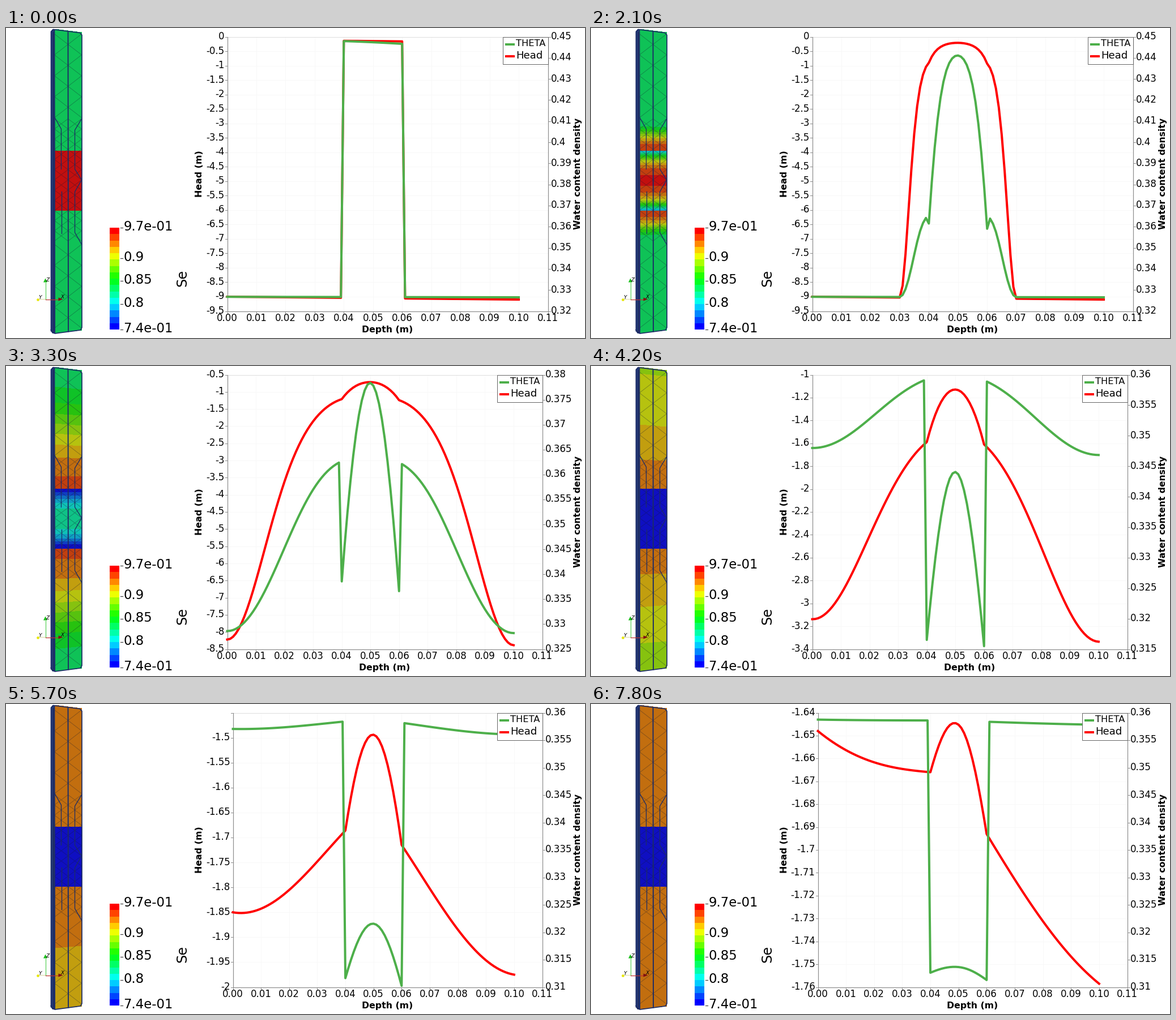
Animation, 1022 px wide and 548 px high, one loop 8000 ms. Source, as a matplotlib script:

```python
import colorsys

import numpy as np
import matplotlib.pyplot as plt
from matplotlib.animation import FuncAnimation
from matplotlib.colors import ListedColormap
from matplotlib.patches import Polygon, Rectangle

W, H, DPI = 1022, 548, 100
TOP, BOTTOM = 15, 500
GREEN, RED, NAVY = "#4daf4a", "#ff0000", "#1c2c66"
PX = 72 / DPI

plt.rcParams["font.family"] = "DejaVu Sans"
fig = plt.figure(figsize=(W / DPI, H / DPI), dpi=DPI, facecolor="white")
ax = fig.add_axes([0, 0, 1, 1])
ax.axis("off")


# ---------- soil model ----------
D = np.arange(101) / 1000            # depth of each node
LAYER = np.abs(D - 0.05) - 0.01      # distance outside the middle layer
INSIDE = LAYER < 0.0005

# step: head without gravity at the top, upper joint, centre, lower joint, bottom
KEYS = {
    0: (-9, -0.1, -0.1, -0.1, -9),
    1: (-9, -0.86, -0.1, -0.87, -9),
    7: (-9, -0.86, -0.16, -0.87, -9),
    10: (-9, -1.12, -0.54, -1.13, -9),
    11: (-8.22, -1.17, -0.664, -1.18, -8.285),
    14: (-3.138, -1.549, -1.079, -1.549, -3.235),
    19: (-1.85, -1.646, -1.444, -1.655, -1.875),
    23: (-1.6875, -1.6323, -1.5595, -1.6405, -1.7018),
    26: (-1.648, -1.626, -1.5952, -1.633, -1.6585),
}


def key_heads(t):
    """Key heads at step t, each stretch slowing down exponentially."""
    times = list(KEYS)
    k = min(np.searchsorted(times, t, "right") - 1, len(times) - 2)
    a, b = times[k], times[k + 1]
    u = (1 - np.exp(-0.3 * (t - a))) / (1 - np.exp(-0.3 * (b - a)))
    return (1 - u) * np.array(KEYS[a]) + u * np.array(KEYS[b])


def blend(far, near, u, bend):
    """Suction from far to near in log scale along a sine-squared rise."""
    u = np.clip(u, 0, 1)
    rise = (np.sin(np.pi / 2 * u * bend) / np.sin(np.pi / 2 * bend)) ** 2
    return far * (near / far) ** rise


def head(t):
    top, joint0, centre, joint1, bottom = key_heads(t)
    upper = D <= 0.05
    end, joint = np.where(upper, top, bottom), np.where(upper, joint0, joint1)
    reach = 0.01 * 2 ** ((t - 7) / 2)          # how far the wetting front has come
    bend = 0.45 + 0.44 * (1 - (joint / end) ** 2.4)
    outer = blend(end, joint, 1 - LAYER / min(reach, 0.04), bend)
    inner = blend(centre, joint, 1 + LAYER / min(reach, 0.01), 0.4)
    return np.where(INSIDE, inner, outer) - D


def water(h):
    p = np.log(-h)
    return np.where(INSIDE,
                    np.polyval([0.003415, -0.007968, -0.076904, 0.3535], p),
                    np.polyval([0.0011, -0.00624, -0.0088, 0.36457], p))


def saturation(theta, d):
    se = np.where(INSIDE, theta / 0.46, 0.927 + 3.3 * (theta - 0.3568))
    parts = [np.interp(d, D[a:b], se[a:b]) for a, b in ((0, 40), (40, 61), (61, 101))]
    return np.where(d < 0.04, parts[0], np.where(d < 0.06, parts[1], parts[2]))


# ---------- drawing helpers ----------
def line(x, y, color, px=1.0, z=2, **kw):
    return ax.plot(x, y, color=color, lw=px * PX, zorder=z, **kw)[0]


def text(x, y, s, px, ha="center", z=6, **kw):
    return ax.text(x, y, s, fontsize=px * PX, ha=ha, va="center", zorder=z, **kw)


# ---------- sample column ----------
RAINBOW = [colorsys.hsv_to_rgb((15 - i) / 15 * 2 / 3, 1, 1) for i in range(16)]
SHADED = ListedColormap([[c * 0.7 + 0.06 for c in rgb] for rgb in RAINBOW])

ROWS = 540
edge = np.linspace(0, 1, ROWS + 1)
cell = (edge[:-1] + edge[1:]) / 20
fx = np.tile([85.0, 133.5], (ROWS + 1, 1))
fy = np.column_stack([1.5 + 537 * edge, 7 + 526 * edge])
face = ax.pcolormesh(fx, fy, np.zeros((ROWS, 1)), cmap=SHADED, vmin=0, vmax=16, zorder=2)

# integer coordinates are pixel centres
ax.set_xlim(-0.5, W - 0.5)
ax.set_ylim(H - 0.5, -0.5)

ax.add_patch(Polygon([(85, 3), (82, 2), (79, 6), (79, 535), (82, 539), (86, 539)],
                     fc="#243a78", ec=NAVY, lw=PX, zorder=2))
line([82, 82], [6, 536], "#1a2250", 1, 3)


def net(xs, y0, y1, dy):
    """Zigzag triangle edges between neighbouring columns."""
    px, py = [], []
    for n, (a, b) in enumerate(zip(xs[:-1], xs[1:])):
        if n % 2:
            a, b = b, a
        for y in np.arange(y0, y1 - dy / 2, dy):
            px += [a, b, a, np.nan]
            py += [y, y + dy / 2, y + dy, np.nan]
    line(px, py, "#101830", 0.9, 3, alpha=0.34)


net([85, 109, 133], 10, 160, 37)
net([85, 97, 109, 121, 133], 160, 380, 18)
net([85, 109, 133], 382, 530, 37)

line([109, 109.5], [6, 536], NAVY, 1.9, 4)
line([85, 97, 97], [157, 178, 249], NAVY, 1.3, 4)
line([97, 97], [288, 362], NAVY, 1.3, 4)
line([133, 121, 121, 133, 121, 121, 133],
     [160, 180, 249, 268, 289, 361, 382], NAVY, 1.3, 4)
line([85, 85.5], [4, 539], NAVY, 1.6, 4)
line([79, 79, 83, 130, 133.5, 133.5, 131, 86, 82, 79],
     [535, 6, 2, 8, 12, 529, 533.5, 539.5, 538, 533], NAVY, 1.7, 4)

# orientation marker
line([69, 69], [479, 449], "#55d055", 1.2, 5)
line([69, 92], [479, 479], "#c03030", 1.2, 5)
line([57, 69], [479.5, 479], "#d8d8a0", 1, 5)
ax.add_patch(Polygon([(69, 442), (65.5, 449), (72.5, 449)], fc="#18c018", ec="none", zorder=5))
ax.add_patch(Polygon([(100, 479), (92, 476), (92, 482)], fc="#801010", ec="none", zorder=5))
line([55.5], [479.5], "#e6e600", 1, 5, marker="o", ms=4.6 * PX, mec="none")
for x, y, s in ((73, 445, "Z"), (60, 476, "Y"), (99, 475, "X")):
    text(x, y, s, 9, style="italic")

# ---------- colour legend ----------
for i, rgb in enumerate(RAINBOW):
    ax.add_patch(Rectangle((182.5, 532.5 - (i + 1) * 11.25), 17, 11.25, fc=rgb, ec="none",
                           antialiased=False))
for y, s in ((351, "9.7e-01"), (404.5, "0.9"), (445, "0.85"), (486, "0.8"), (531, "7.4e-01")):
    line([201, 205], [y + 1.5, y + 1.5], "#444444", 1.2)
    text(207, y, s, 22.7, "left")
text(311, 441, "Se", 24, rotation=90)

# ---------- chart ----------
text(341, 257, "Head (m)", 15.9, rotation=90, weight="bold")
text(1009, 257, "Water content density", 15.6, rotation=90, weight="bold")
xtitle = text(673, 533, "Depth (m)", 15.8, weight="bold")
head_line = line([], [], RED, 4, 4, solid_joinstyle="round")
theta_line = line([], [], GREEN, 4, 5, solid_joinstyle="round")
live = []


def axis_range(v):
    """Finest 1-2-5 step that needs at most 21 intervals."""
    for step in (0.001, 0.002, 0.005, 0.01, 0.02, 0.05, 0.1, 0.2, 0.5, 1):
        lo = int(np.floor(v.min() / step + 1e-6))
        hi = int(np.ceil(v.max() / step - 1e-6))
        if hi - lo <= 21:
            return lo, hi, step


def to_y(v, lo, hi, step):
    return BOTTOM - (v / step - lo) / (hi - lo) * (BOTTOM - TOP)


def frame_axes(left, right, h_axis, t_axis):
    add = live.append
    unit = (right - left) / 11
    for k in range(12):
        x = left + k * unit
        add(line([x, x], [TOP, BOTTOM], "#f8f8f8", 1, 1))
        add(line([x, x], [BOTTOM, BOTTOM + 4], "#909090", 1))
        add(text(x, 512.5, f"{k / 100:.2f}", 16.6))
    for (lo, hi, step), x, way in ((h_axis, left, -1), (t_axis, right, 1)):
        for k in range(lo, hi + 1):
            y = to_y(k * step, lo, hi, step)
            if way < 0:
                add(line([left, right], [y, y], "#f8f8f8", 1, 1))
            add(line([x, x + 4 * way], [y, y], "#909090", 1))
            if way < 0 and step == 0.05 and k == hi:
                continue
            add(text(x + 5 * way, y - 0.5, f"{k * step:.6g}", 16.6,
                     "right" if way < 0 else "left"))
    add(line([left, right], [TOP, TOP], "#dddddd", 1))
    add(line([left, left, right, right], [TOP, BOTTOM, BOTTOM, TOP], "#8c8c8c", 1.2))

    box = Rectangle((right - 80, TOP), 80, 48, fc="white", ec="#666666", lw=PX, zorder=7)
    add(ax.add_patch(box))
    for y, c, s, px in ((28, GREEN, "THETA", 16.2), (49.5, RED, "Head", 18.2)):
        add(line([right - 76, right - 59], [y, y], c, 4, 8, solid_capstyle="butt"))
        add(text(right - 56, y - 0.5, s, px, "left", 8))


def update(i):
    h = head(min(i // 3, 26))
    theta = water(h)
    h_axis, t_axis = axis_range(h), axis_range(theta)
    left = 400 if h_axis[2] < 0.1 else 390
    right = 946 if t_axis[2] < 0.01 else 956

    while live:
        live.pop().remove()
    frame_axes(left, right, h_axis, t_axis)
    xtitle.set_x((left + right) / 2)

    x = left + D / 0.11 * (right - left)
    head_line.set_data(x, to_y(h, *h_axis))
    theta_line.set_data(x, to_y(theta, *t_axis))

    band = np.floor((saturation(theta, cell) - 0.74) / 0.23 * 16)
    face.set_array((np.clip(band, 0, 15) + 0.5).reshape(ROWS, 1))
    return []


anim = FuncAnimation(fig, update, frames=80, interval=100, repeat=True, repeat_delay=0,
                     init_func=lambda: [], blit=False)
plt.show()
```
